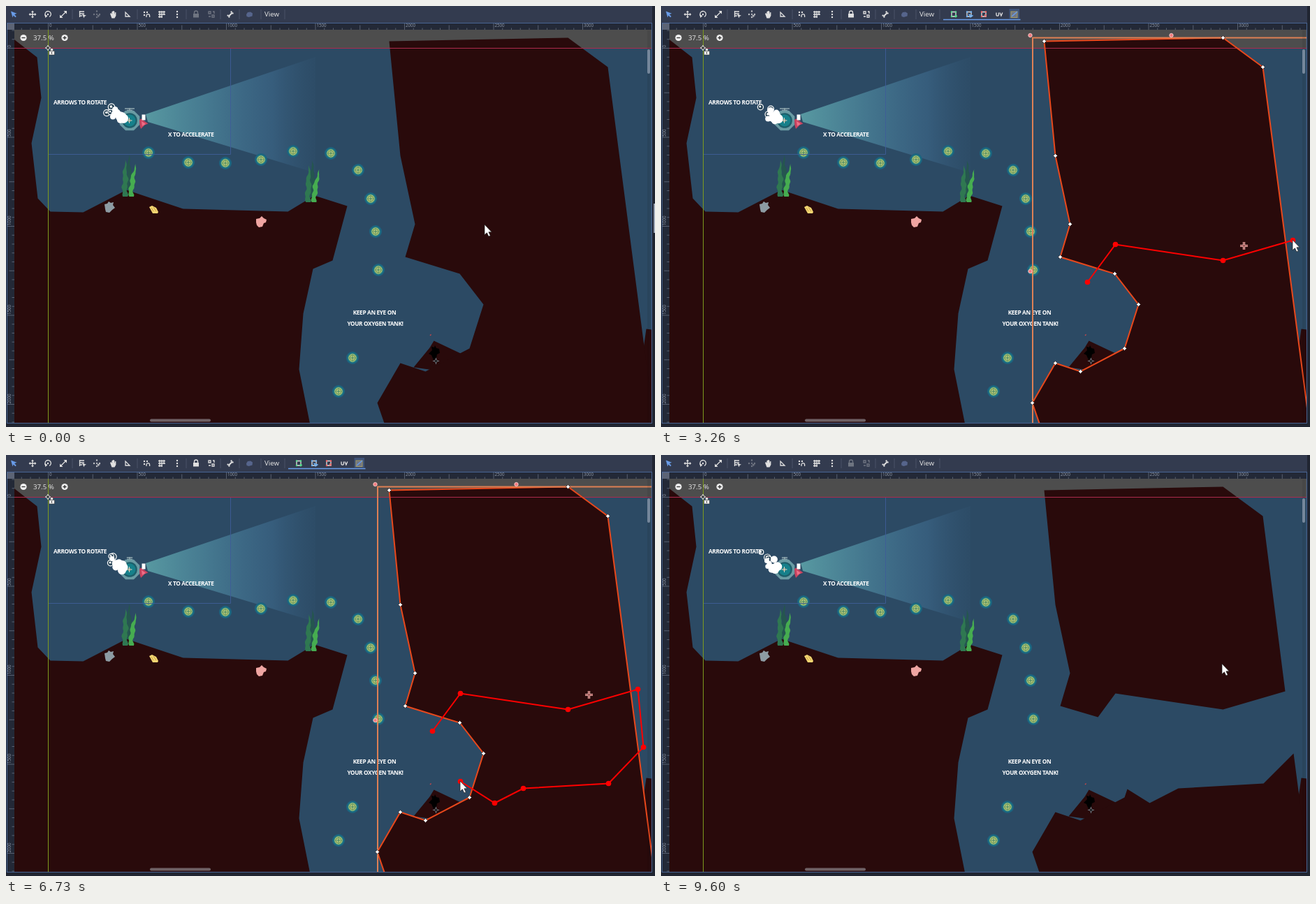
Recreate the animation shown at these times as an HTML page. Size 929 px wide and 603 px high, loop 9.66 s.

```html
<!DOCTYPE html>
<html lang="en">
<head>
<meta charset="utf-8">
<title>Cutting a rock in a level editor</title>
<style>
html, body { margin: 0; width: 100%; height: 100%; overflow: hidden; background: #202531; }
svg { display: block; width: 929px; height: 603px; }
.ui { font: 9.7px "Noto Sans", sans-serif; fill: #e0e0e0; }
.title { font-size: 11px; font-weight: 600; }
.hint { font: 600 12px "Noto Sans", sans-serif; font-stretch: 62.5%; letter-spacing: -.04em; fill: #fff; }
.ruler { font: 6.2px "Noto Sans", sans-serif; fill: #8b93a3; }
.icon { fill: none; stroke: #e0e0e0; stroke-width: 1.3; }
.solid { fill: #e0e0e0; }
</style>
</head>
<body>
<svg id="stage" viewBox="0 0 929 603" xmlns="http://www.w3.org/2000/svg"></svg>
<script>
const LOOP = 9660, WATER = '#2c4a64', ROCK = '#290a0b';
const PICK = 560, TOOL = 1040, DONE = 6900, REPICK = 7550, ASK = 8430, CONFIRM = 8900;

// Outline of the big rock in parts, so the cut pieces share their edges.
const head = [[571,359], [585,312], [564,214], [548,50], [804,45], [861,87]];
const base = [[942,710], [572,687], [531,568], [564,511], [600,523], [663,490]];
const cave = [[683,427], [649,383]];
const roof = [[893,338], [804,364], [650,341], [625,375]];
const floor = [[667,478], [699,498], [740,477], [862,470], [905,427]];
const bigRock = [...head, ...base, ...cave];
const piece = [...roof, ...[...cave].reverse(), ...floor];
const leftRock = [[0,38], [12,48], [44,73], [50,131], [36,196], [45,275], [63,294], [110,295], [172,263], [253,290],
  [403,294], [441,271], [488,286], [467,364], [439,376], [425,440], [419,520], [437,610], [0,610]];
const coins = [[204,210], [261,224], [314,225], [365,220], [411,208], [465,211], [504,235], [522,276], [529,323],
  [533,378], [496,504], [476,552]];

// Where the pointer clicks: x, y, time.
const clicks = [[685,313,PICK], [505,13,TOOL], [610,395,1700], [650,341,2050], [804,364,2700], [904,335,3260],
  [912,418,3850], [862,470,4930], [740,477,5500], [699,498,5950], [650,467,6600],
  [733,446,REPICK], [733,446,9060], [803,299,9560]];
const cut = clicks.slice(2, 11);

const poly = (pts, attrs) => `<polygon points="${pts.join(' ')}" ${attrs}/>`;
const rock = pts => poly(pts, `fill="${ROCK}"`);
const rect = (x, y, w, h, attrs) => `<rect x="${x}" y="${y}" width="${w}" height="${h}" ${attrs}/>`;
const circle = (x, y, r, attrs) => `<circle cx="${x}" cy="${y}" r="${r}" ${attrs}/>`;
const path = (d, attrs) => `<path d="${d}" ${attrs}/>`;
const text = (x, y, s, cls, more = '') => `<text x="${x}" y="${y}" class="${cls}" ${more}>${s}</text>`;
const group = (id, body, attrs = '') => `<g id="${id}" ${attrs}>${body}</g>`;
const at = (x, y, body) => `<g transform="translate(${x} ${y})">${body}</g>`;
const mid = 'text-anchor="middle"';
const half = 'transform="translate(.5 .5)"';
const range = n => Array.from({ length: n }, (_, i) => i);
const hash = n => { const s = Math.sin(n * 127.1 + 3.7) * 43758.5453; return s - Math.floor(s); };
const smooth = k => k * k * (3 - 2 * k);
const fix = v => v.toFixed(1);

function rulers() {
  let d = '', labels = '';
  for (let i = -4; i < 70; i++) {
    const p = 60.5 + i * 12.75, big = i % 10 === 0;
    const from = big ? 0 : i % 5 === 0 ? 3.5 : 7.5;
    if (p > 12 && p < 924) d += `M${p} ${24 + from}V34`;
    if (p > 34 && p < 597) d += `M${1 + from} ${p}H12`;
    if (!big) continue;
    if (p < 920) labels += text(p + 1.5, 30, i * 50, 'ruler');
    if (p < 597) labels += text(0, 0, i * 50, 'ruler', `transform="translate(7 ${p - 1}) rotate(-90)"`);
  }
  return rect(1, 24, 923, 10, 'fill="#232937"') + rect(1, 24, 11, 573, 'fill="#232937"') +
    rect(1, 24, 11, 10, 'fill="#5c6475"') + path(d, 'stroke="#5f6778" stroke-width=".9"') + labels;
}

// One toolbar icon around its own centre: stroked part, then filled part.
const icon = (x, line, solid = '', color = '#e0e0e0') => at(x, 12,
  path(line, `class="icon" style="stroke:${color}"`) + path(solid, `class="solid" style="fill:${color}"`));
const dot = (x, y) => `M${x - 1.2} ${y}a1.2 1.2 0 1 0 2.4 0a1.2 1.2 0 1 0-2.4 0`;
const grid = 'M-5-3.5H5M-5 0H5M-5 3.5H1M-3-5V5M0-5V5M3-5V1';

function toolbar() {
  const points = (x, color, mark) => icon(x, 'M-3-3.5H3V3H-3Z') +
    icon(x, mark, dot(-3, -3.5) + dot(3, -3.5) + dot(-3, 3), color);
  const seps = [95, 188, 258, 307, 334, 365, 399].map(x => `M${x} 5V19`).join('');
  return path(seps, 'stroke="#4b5368"') +
    icon(11, '', 'M-4-4.5L4.5-1.3 1.1.1 3.8 2.9 2.4 4.3-.4 1.5-1.5 4.5Z', '#699ce8') +
    icon(38, 'M0-4V4M-4 0H4', 'M0-5.5l2 2.5h-4zM0 5.5l2-2.5h-4zM-5.5 0l2.5-2v4zM5.5 0l-2.5-2v4z') +
    icon(60, 'M-3 2.5A4.2 4.2 0 1 1 2 3.5', 'M-5 0l4.5 2-3 3z' + dot(0, 0)) +
    icon(82, 'M-3 3L3-3', 'M.5-5H5V-.5zM-5 .5V5H-.5z') +
    icon(109, 'M-4-4H3M-4-1H3M-4 2H0M-3.5-5V4', 'M0-.5L6 1.8 3.5 2.8 2.5 5.3z') +
    group('pivot', icon(130, '', [[0, -4.5], [-4, 0], [0, 0], [0, 4], [4, 0]].map(p => dot(...p)).join('') + 'M0 0l5 2-2 .7-.8 2z')) +
    icon(153, '', 'M-4-1l1.5-1 1 1.5V-4h1.3v3.5V-5h1.3v4.5V-4.5h1.3V0l.8-3h1.2V2l-2 3.5h-4z') +
    icon(174, 'M-3-3V3H3Z') +
    icon(201, 'M0 4V2a2.3 2.3 0 0 1 4.6 0v2', dot(-3, -3) + dot(1, -3) + dot(-3, 1)) +
    icon(223, grid) + icon(245, '', dot(0, -4) + dot(0, 0) + dot(0, 4)) +
    group('locks', icon(272, 'M-2.5-1v-1.500a2.5 2.5 0 0 1 5 0V-1', 'M-4-1H4V4.500H-4z') +
      icon(294, 'M-4-4h3v3h-3zM1 1h3v3h-3zM-4 3h3M2-4h2v3')) +
    icon(321, 'M-2.5 2.5L2.5-2.5M-2 3L3-2', [[-3.4, 1.6], [-1.6, 3.6], [1.6, -3.6], [3.5, -1.6]].map(p => dot(...p)).join('')) +
    icon(348, '', 'M-4 0l2-3 4-.5 3 2L4.500 2.500-.5 4l-3-1z', '#56658c') +
    text(370, 15.3, 'View', 'ui') +
    group('polyTools', points(419, '#4fe08a', 'M3 .5V4.500M1 2.500H5') + points(441, '#6ab0f5', 'M0 0L5 2 2 4Z') +
      points(462, '#ff5f5f', 'M1 .5l3 3m0-3l-3 3') +
      icon(484, 'M-4-2.500v3a1.700 1.700 0 0 0 3.400 0v-3M1-2.500L2.900 2 4.800-2.500') +
      path('M404 19.500H514.500', 'stroke="#699ce8" stroke-width="1.300"') +
      group('cutOff', rect(501, 8, 9, 8.5, 'fill="#e8823c" stroke="#f0d8c0"') + path('M501 8H507L501 14Z', 'fill="#f5f0e8"')) +
      group('cutOn', rect(498.5, 4, 14.5, 15, 'fill="#3f5377"') +
        rect(501, 8, 9, 8.5, 'fill="#6f7686" stroke="#a89a5c"') + path('M502 15L510 8', 'stroke="#699ce8" stroke-width="1.500"')));
}

function sub() {
  const oct = range(8).map(i => (i + .5) * Math.PI / 4).map(a => [177 + 15.5 * Math.cos(a), 164 + 15.5 * Math.sin(a)].map(fix));
  return path('M177 150V146', 'stroke="#7f979f" stroke-width="2"') + path('', 'id="rotor" stroke="#8fa6ad" stroke-width="1.500"') +
    poly(oct, 'fill="#6a9ba3"') + circle(177, 164, 10.8, 'fill="#1d5f6b"') + circle(177, 164, 8.5, 'fill="#16808a"') +
    path('M172.500 164h8M176.500 160v8', 'stroke="#cfe3df"') + circle(176.5, 164, 1.8, 'fill="none" stroke="#e6a06a" stroke-width=".7"') +
    path('M191 163l2.500-1.500 10 7-5 2-5.500 5.500-1.500-5z', 'fill="#c9435f"') + path('M194 165l6 4-5 3z', 'fill="#ee7088"') +
    rect(194.5, 155.5, 5, 8, 'fill="#fff"');
}

const coin = ([x, y]) => at(x, y, circle(0, 0, 9, 'fill="#1b6480"') + circle(0, 0, 6.8, 'fill="#2d8a86"') +
  circle(0, 0, 5.2, 'fill="#86a862" stroke="#b3c477"') + circle(0, 0, 2.4, 'fill="none" stroke="#dde08a"') +
  path('M-5 0H5M0-5V5', 'stroke="#4d8f6c" stroke-width=".8"'));

function selection(pts, x, y, w, h, [mx, my]) {
  const spots = [-3.5, .5, 1].map((k, i) => i === 1 ? [w / 2, h / 2] : k < 0 ? [k, k] : [w + 3.5, h + 3.5]);
  let knobs = '';
  for (const i of [0, 1, 2]) for (const j of [0, 1, 2])
    if (i !== 1 || j !== 1) knobs += circle(x + spots[i][0], y + spots[j][1], 2.7, 'fill="#f27d80" stroke="#f7cfcf" stroke-width=".9"');
  const cross = (color, width) => path('M-5.500 0h11M0-5.500v11', `stroke="${color}" stroke-width="${width}"`);
  return poly(pts, 'fill="none" stroke="#e8481c" stroke-width="2"') +
    rect(x, y, w, h, 'fill="none" stroke="#de8055" stroke-width="2"') +
    pts.map(([a, b]) => path(`M${a} ${b - 3}l3 3-3 3-3-3z`, 'fill="#fff" stroke="#3a2a2a" stroke-width=".8"')).join('') +
    knobs + at(mx, my, cross('#f3b4b0', 3.2) + cross('#7c3535', 1));
}

function dialog() {
  return rect(417, 251, 124, 68, 'fill="#343b51" stroke="#252b3a"') +
    text(478.5, 263, 'Please Confirm...', 'ui title', mid) +
    path('M528 256l6.500 6.500m0-6.500l-6.500 6.500', 'stroke="#e0e0e0" stroke-width="1.400"') +
    text(425, 285, 'Delete node "Rock27"?', 'ui') +
    rect(438.5, 296.5, 21, 16.5, 'fill="#262c3b" stroke="#699ce8"') + text(449, 308, 'OK', 'ui', mid + ' style="fill:#8fb4ec"') +
    rect(479, 296, 40, 17.5, 'fill="#262c3b"') + text(499, 308, 'Cancel', 'ui', mid);
}

const decor = path('M141 284l4-1 2-3 3 2 4-1-1 4 3 4-4 3-4 4-5-1-1-4z', 'fill="#8d9ba3"') +
  path('M205 288l4-2 6 3 3 6-1 2h-7z', 'fill="#f5d672"') + path('M208 289l3 5m0-6l4 6', 'stroke="#b8943c" stroke-width=".8"') +
  path('M358 305l5-1 3-3 3 3 4 2-1 4-3 1-2 5-5 1-3-3-1-4z', 'fill="#efa5a2"') +
  path('M605 498l5-5-1-5 4 1 1-3 2 4 4 1 1 6-4 2-1 5-4 3-3-7z', 'fill="#000"') +
  path('M607 472l1.500-1.500', 'stroke="#d04848" stroke-width="1.300"') +
  path('M611 508.500h9M615.500 504v9', 'stroke="#74808a"') + circle(615.5, 508.5, 2, 'fill="#111" stroke="#74808a" stroke-width=".8"');

const hint = (x, y, s, more = '') => text(x, y, s, 'hint', 'dy=".357em" ' + more);
const zoomButton = (x, d) => at(x, 45.5, circle(0, 0, 4.6, 'fill="#f0f0f0"') + path(d, 'stroke="#333" stroke-width="1.300"'));

const scene = rect(12, 34, 912, 563, 'fill="#4d4d4d"') + rect(12, 60, 912, 537, `fill="${WATER}"`) +
  poly([[200, 155], [443, 73], [443, 239], [203, 166]], 'fill="url(#beam)"') + group('weedBack', '') +
  group('rocks', rock(leftRock) + rock([[916, 462], [930, 464], [930, 610], [900, 610], [912, 490]]) +
    rock([[583, 517], [606, 489], [612, 479], [650, 497], [664, 490], [640, 525]]) +
    group('whole', rock(bigRock)) + group('halves', rock([...head, ...roof]) + rock([...base, ...floor])), half) +
  group('weed', '') + decor + coins.map(coin).join('') + sub() + group('bubbles', '') +
  hint(68, 138.5, 'ARROWS TO ROTATE') + hint(232, 184, 'X TO ACCELERATE') +
  hint(527.5, 439.5, 'KEEP AN EYE ON', mid) + hint(528.5, 455, 'YOUR OXYGEN TANK!', mid) +
  path('M60.500 212.500H321.500V60.500', 'fill="none" stroke="#3f5d98" stroke-width=".9"') +
  path('M12 60.500H924', 'stroke="#ad2b4c"') + path('M60.500 34V597', 'stroke="#7d9a1e"') +
  group('pickBig', selection(bigRock, 531.5, 45, 397, 669, [834, 343]), half) +
  group('pickPiece', selection(piece, 624.5, 337.5, 281, 160, [743, 416]), half) +
  path('M56 60h8M60 56v8', 'stroke="#fff"') + circle(60, 60, 2.3, 'fill="#333" stroke="#ddd"') +
  path('M61.500 64.500h8v5.500h-8zM63.500 64v-1.500a2 2 0 0 1 4 0V64', 'fill="#f0f0f0" stroke="#333" stroke-width=".6"') +
  path('M65.500 66v2.500', 'stroke="#333"') + group('cutLine', '', half) +
  zoomButton(25, 'M-2.500 0h5') + zoomButton(84, 'M-2.500 0h5M0-2.500v5') + text(39, 49, '37.5 %', 'ui') +
  rect(918, 35, 4, 562, 'fill="#000" opacity=".08"') + rect(918, 62, 4, 35, 'rx="2" fill="#a9b4c4" opacity=".6"') +
  rect(206, 591.5, 87, 4, 'rx="2" fill="#a9a9b0" opacity=".55"');

const stop = (k, color, alpha) => `<stop offset="${k}" stop-color="${color}" stop-opacity="${alpha}"/>`;
const stage = document.getElementById('stage');
stage.innerHTML = `<defs><clipPath id="view">${rect(12, 34, 912, 563, '')}</clipPath>
  <linearGradient id="beam" gradientUnits="userSpaceOnUse" x1="198" x2="443" y1="0" y2="0">` +
  stop(0, '#60a8ac', .85) + stop(.4, '#5596ac', .58) + stop(.75, '#4a80a8', .35) + stop(1, '#3a6488', .08) +
  '</linearGradient></defs>' + rect(0, 0, 929, 603, 'fill="#202531"') + rect(0, 0, 925, 24, 'fill="#333b4f"') +
  toolbar() + rulers() + group('world', scene, 'clip-path="url(#view)"') +
  group('focus', rect(1.5, 24.5, 923, 573, 'fill="none" stroke="#4d6a9c" stroke-width=".9"')) +
  group('dock', rect(927, 283, 2, 42, 'fill="#9aa3b3"')) +
  group('modal', rect(0, 0, 929, 603, 'fill="#000" opacity=".5"') + dialog()) +
  group('cursor', path('M0 0V14.800L3.400 11.800 5.800 17 8.300 15.900 5.900 10.800H10.200Z', 'fill="#fff" stroke="#222" stroke-width=".7"'));

const el = {};
stage.querySelectorAll('[id]').forEach(n => el[n.id] = n);
const show = (id, on) => el[id].setAttribute('visibility', on ? 'inherit' : 'hidden');

// The hints share one type size, chosen from the natural width of the face.
const hints = [...stage.querySelectorAll('.hint')];
const size = Math.min(12.5, 12 * 76 / hints[0].getComputedTextLength());
hints.forEach(n => n.style.fontSize = size + 'px');

function blade(x, y, h, lean, w, color, phase, t) {
  const left = [], right = [];
  for (const i of range(21)) {
    const s = i / 20, sway = Math.sin(t / 520 + phase - s * 2) * 1.2 * s;
    const cx = x + lean * s * s + sway + Math.sin(s * 15 + phase) * .8;
    const r = w * Math.min(1, (1 - s) * 2.2) * (.82 + .18 * Math.sin(s * 30));
    left.push([fix(cx - r), fix(y - h * s)]);
    right.unshift([fix(cx + r), fix(y - h * s)]);
  }
  return poly([...left, ...right], `fill="${color}"`);
}

function drawWeed(t) {
  const roots = [[172, 273], [434, 281]];
  el.weedBack.innerHTML = roots.map(([x, y], p) => blade(x + 5, y, 60, 0, 5, '#25564f', p, t)).join('');
  el.weed.innerHTML = roots.map(([x, y], p) => blade(x - 2, y, 53, 2, 4.3, '#2f7851', p + 1, t) +
    blade(x + 7, y, 47, 7, 4, '#46ad50', p + 2, t)).join('');
}

function drawBubbles(t) {
  let foam = '', rings = '';
  for (const i of range(18)) {
    const age = t / 950 + i / 18 + 7, k = Math.floor(age), a = age - k, n = i * 13 + k * 7.3;
    const x = fix(169 - 27 * a * (.5 + .6 * hash(n)));
    const y = fix(161 + (hash(n + 1) - .5) * 17 * Math.min(1, a * 3) - 19 * a * a);
    const r = (4.5 + 2.5 * hash(n + 2)) * (1 - a * .55);
    if (a < .62) foam += circle(x, y, fix(r), 'fill="#fff"');
    else if (i % 2) rings += circle(x, y, fix(r + .8), 'fill="#2b4658" stroke="#fff" stroke-width="1.200"') +
      circle(x - .6, y - .6, fix(r * .45), 'fill="#fff"');
  }
  el.bubbles.innerHTML = rings + foam;
}

function drawCut(t) {
  const pts = t < DONE ? cut.filter(p => t >= p[2]) : [];
  el.cutLine.innerHTML = `<polyline points="${pts.map(([x, y]) => [x, y]).join(' ')}" fill="none" stroke="#f00" stroke-width="2"/>` +
    pts.map(([x, y]) => circle(x, y, 3.8, 'fill="#f00"')).join('');
}

// Rest on each click, then glide to arrive just before the next one.
function drawCursor(t) {
  const next = clicks.findIndex(c => c[2] > t);
  const i = next < 0 ? clicks.length - 1 : next;
  const [x1, y1, t1] = clicks[i], [x0, y0, t0] = clicks[Math.max(0, i - 1)];
  const end = t1 - 40, start = Math.max(t0 + 50, end - 480);
  const k = smooth(Math.min(1, Math.max(0, (t - start) / (end - start))));
  el.cursor.setAttribute('transform', `translate(${x0 + (x1 - x0) * k} ${y0 + (y1 - y0) * k})`);
}

function draw(t) {
  const big = t >= PICK && t < DONE, small = t >= REPICK && t < CONFIRM, any = big || small;
  const cutting = t >= TOOL && t < DONE;
  show('pickBig', big);
  show('pickPiece', small);
  show('polyTools', any);
  show('cutOn', cutting);
  show('cutOff', any && !cutting);
  show('whole', t < CONFIRM);
  show('halves', t >= CONFIRM);
  show('dock', t < PICK);
  show('focus', t < TOOL || t > 1700);
  show('modal', t >= ASK && t < CONFIRM);
  el.pivot.setAttribute('opacity', any ? .8 : .35);
  el.locks.setAttribute('opacity', any ? 1 : .35);
  const w = 4 + 3 * Math.abs(Math.cos(t / 130));
  el.rotor.setAttribute('d', `M${177 - w} 147H${177 + w}M173 149.500H181`);
  drawWeed(t);
  drawBubbles(t);
  drawCut(t);
  drawCursor(t);
}

function tick() {
  draw(performance.now() % LOOP);
  requestAnimationFrame(tick);
}
tick();
</script>
</body>
</html>
```
